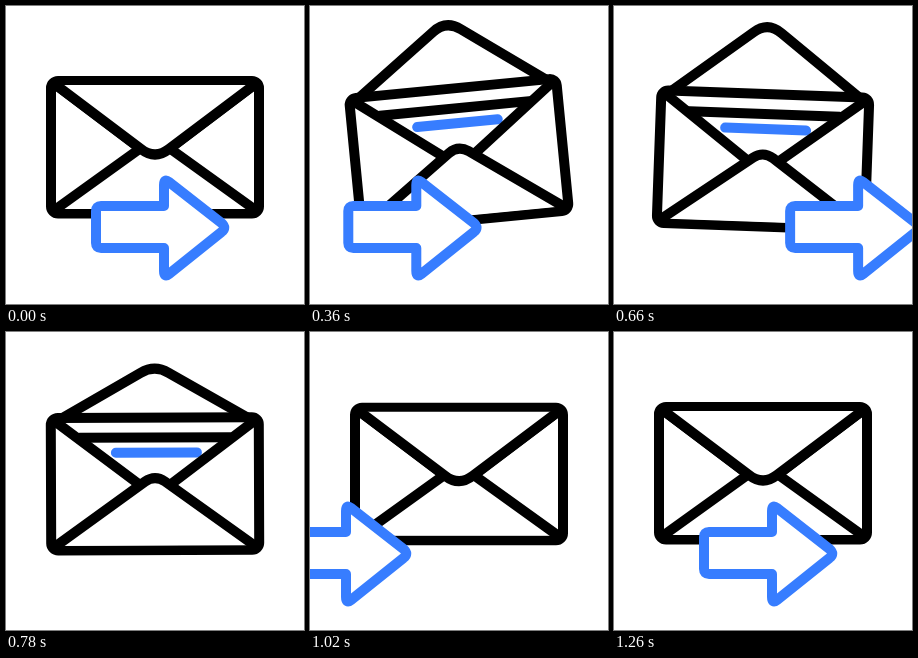
Write an HTML page that moves like this. It is 298x298 px and loops after 1.5 s.

```html
<!DOCTYPE html>
<html lang="en">
<head>
<meta charset="utf-8">
<title>Send mail</title>
<style>
html, body { margin: 0; width: 100%; height: 100%; overflow: hidden; background: #fff; }
svg { display: block; width: 100%; height: 100%; }
path, rect { fill: #fff; stroke: #000; stroke-width: 10; stroke-linejoin: round; stroke-linecap: round; }
.line { fill: none; }
.blue { stroke: #377dff; }
</style>
</head>
<body>
<svg viewBox="0 0 298 298">
  <g id="mail">
    <rect id="back" x="45" y="75" width="208" height="132.5" rx="7"/>
    <path class="line" d="M74 95H224"/>
    <path class="line blue" d="M110 110H191"/>
    <path class="line" d="M50 79L140 147M248 79L158 147"/>
    <path d="M50 203L139 139Q149 132 159 139L248 203"/>
    <path id="flap"/>
  </g>
  <path id="arrow" class="blue" d="M163 176L215.5 217Q221 222 215.5 226L163 268Q158 272 158 265V242H95Q90 242 90 237V205Q90 200 95 200H158V179Q158 172 163 176Z"/>
</svg>
<script>
const LOOP = 1500, STEP = 30;
const mail = document.getElementById('mail');
const back = document.getElementById('back');
const flap = document.getElementById('flap');
const arrow = document.getElementById('arrow');

const ease = u => (1 - Math.cos(Math.PI * u)) / 2;

// Eased value through [time, value] keys
function track(keys, t) {
  if (t <= keys[0][0]) return keys[0][1];
  for (let i = 1; i < keys.length; i++) {
    const [t0, a] = keys[i - 1], [t1, b] = keys[i];
    if (t < t1) return a + (b - a) * ease((t - t0) / (t1 - t0));
  }
  return keys[keys.length - 1][1];
}

const tilt = [[30, 0], [270, -7.9], [570, 3.5], [780, -0.2], [900, 0]];
const drop = [[120, 0], [570, 13], [660, 13], [1080, 0]];
const fold = [[45, 1], [395, -1.02], [710, -1.02], [1010, 1]];
const windUp = [[45, 0], [395, -53]];

// Pulls back, shoots off to the right, glides in from the left
function arrowX(t) {
  if (t < 390) return track(windUp, t);
  if (t < 840) return -53 + 36 * ((t - 390) / 150) ** 2.3;
  if (t < 1260) return -122 * ((1260 - t) / 240) ** 2;
  return 0;
}

// The flap hinges at y = 79 and lies behind the envelope once open
function drawFlap(s) {
  const y = d => (79 + d * s).toFixed(2);
  flap.setAttribute('d', `M50 79L135 ${y(64)}Q149 ${y(75)} 163 ${y(64)}L248 79`);
  mail.insertBefore(flap, s < 0 ? back : null);
}

function draw(t) {
  mail.setAttribute('transform', `translate(0 ${track(drop, t)}) rotate(${track(tilt, t)} 149 141.5)`);
  drawFlap(track(fold, t));
  arrow.setAttribute('transform', `translate(${arrowX(t)} 0)`);
}

const start = performance.now();
function tick() {
  const t = (performance.now() - start) % LOOP;
  draw(Math.floor(t / STEP) * STEP);
  requestAnimationFrame(tick);
}
draw(0);
requestAnimationFrame(tick);
</script>
</body>
</html>
```
